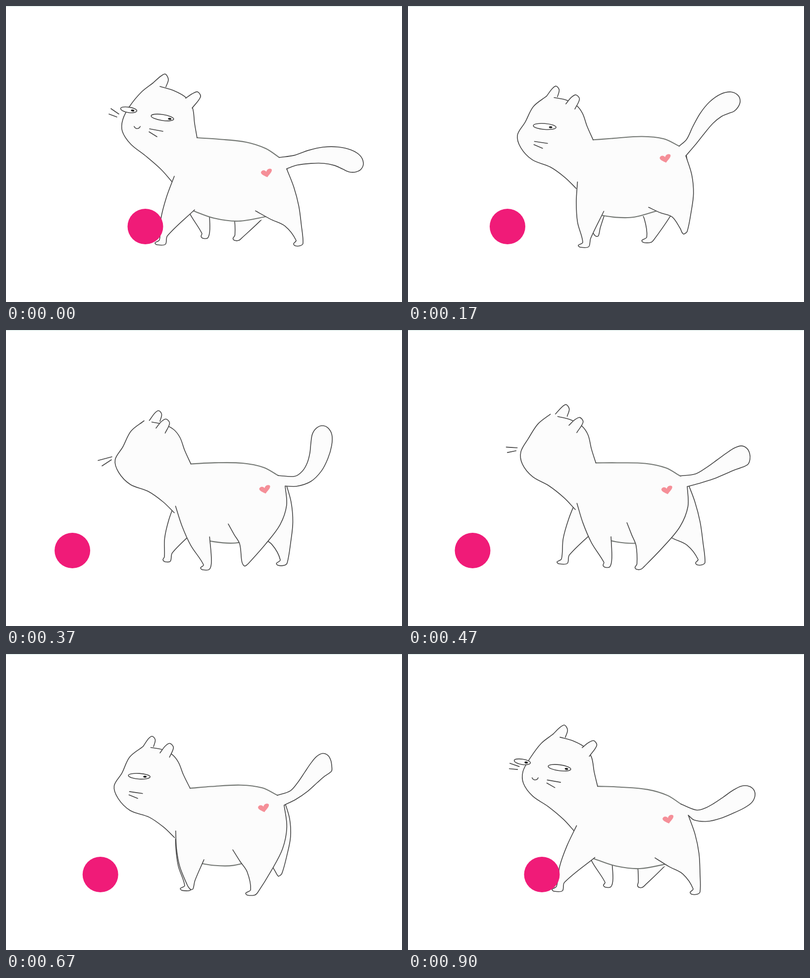
Write an HTML page with a canvas that moves like this. It is 800 px wide and 600 px high and loops after 0.93 s.

```html
<!DOCTYPE html>
<html lang="en">
<head>
<meta charset="utf-8">
<title>Walking cat</title>
<style>
html, body { margin: 0; width: 100%; height: 100%; overflow: hidden; background: #fff }
canvas { display: block }
</style>
</head>
<body>
<canvas id="stage" width="800" height="600"></canvas>
<script>
const ctx = document.getElementById('stage').getContext('2d');
const LOOP = 930, STEPS = 28;
const INK = '#444', SOFT = '#747874', FUR = '#fcfcfc', PINK = '#f01b78';

// Key steps of the walk and the few values that drive the rig there.
const KEYS = [0, 5, 8, 11, 17, 23, 27];
const MOVES = {
  // head raised 0..1, rump lowered 0..1
  sway: [[1, 1], [.52, .18], [0, 0], [.5, .57], [.8, .5], [.13, .14], [.88, .9]],
  // foot x, y and toe length
  front: [[314,484,13], [357,489,13], [380,489,12], [403,486,10], [388,477,2], [346,479,2], [304,481,13]],
  hind: [[592,486,11], [556,462,3], [532,463,2], [482,478,4], [472,489,15], [538,487,15], [582,487,12]],
  // two bend points and the tip
  tail: [
    [600,312, 660,280, 718,330], [585,275, 600,190, 671,193], [595,285, 585,220, 585,144],
    [610,318, 640,275, 639,194], [600,288, 640,238, 715,280], [605,298, 608,230, 600,156],
    [595,345, 630,315, 699,276]],
};

// Two extreme shapes of each part; every pose lies between them.
const HEAD = {
  face: [
    [344,384, 322,366, 295,352, 250,346, 220,323, 205,296, 222,271, 231,236, 261,212],
    [336,357, 313,331, 281,303, 252,280, 235,254, 236,230, 250,203, 274,174, 297,156]],
  crown: [
    [278,210, 298,211, 313,217, 326,229, 341,250, 361,276],
    [311,163, 340,172, 364,186, 377,207, 381,238, 386,267]],
  farEar: [
    [262,211, 269,194, 275,189, 281,193, 279,206],
    [297,156, 313,142, 322,138, 328,149, 323,164]],
  nearEar: [
    [271,211, 280,193, 288,187, 296,194, 295,211],
    [363,187, 376,178, 387,174, 393,184, 376,207]],
  nearWhiskers: [
    [218,302, 244,305, 217,309, 236,314],
    [290,249, 317,254, 289,255, 305,265]],
  farWhiskers: [
    [200,295, 160,321, 202,301, 180,332],
    [228,219, 212,208, 224,225, 208,219]],
};
const BODY = {
  back: [
    [410,268, 470,262, 515,265, 547,279],
    [430,270, 485,276, 525,289, 552,307]],
  belly: [
    [500,412, 455,426, 420,428, 380,424],
    [530,426, 470,436, 420,430, 375,414]],
  hip: [[560,298], [567,330]],
  heart: [[518,302], [526,338]],
};

const mix = ([low, high], t) => low.map((a, i) => a + (high[i] - a) * t);
const mixAll = (parts, t) =>
  Object.fromEntries(Object.entries(parts).map(([name, pair]) => [name, mix(pair, t)]));
const shift = (points, dx) => points.map((v, i) => i % 2 ? v : v + dx);

// Smooth cyclic interpolation between the key rows.
function tween(rows, step) {
  const k = step % STEPS, n = KEYS.length, i = KEYS.findLastIndex(key => key <= k);
  const key = j => KEYS[(j + n) % n] + STEPS * Math.floor(j / n);
  const row = j => rows[(j + n) % n];
  const span = key(i + 1) - key(i), u = (k - key(i)) / span;
  const ease = u * u * (3 - 2 * u);
  return row(i).map((a, c) => {
    const slope = j => (row(j + 1)[c] - row(j - 1)[c]) / (key(j + 1) - key(j - 1)) * span;
    return a + (row(i + 1)[c] - a) * ease
      + slope(i) * u * (1 - u) * (1 - u) - slope(i + 1) * u * u * (1 - u);
  });
}

// Point part of the way from a to b, pushed aside.
const along = (a, b, u, dx, dy = 0) =>
  [a[0] + (b[0] - a[0]) * u + dx, a[1] + (b[1] - a[1]) * u + dy];

function frontLeg([x, y, toe], raise) {
  const top = [345 - 5 * raise, 369 - 24 * raise], ankle = [x - 4, y - 10];
  return [top, along(top, ankle, 1 / 3, -6), along(top, ankle, 2 / 3, -7), ankle,
    [x - toe, y - 4], [x - toe + 4, y], [x + 8, y - 1], [x + 12, y - 18],
    [381 + .34 * (x - 314), 413 + .07 * (x - 314)]].flat();
}

function hindLeg([x, y, toe], hip) {
  const heel = [x + 8, y - 5], ankle = [x - 6, y - 11];
  const thigh = [446 + .5 * (x - 476), 392 + .2 * (x - 476)];
  const bulge = 8 + .17 * (592 - x);
  return [hip, along(hip, heel, .25, .8 * bulge), along(hip, heel, .5, bulge),
    along(hip, heel, .75, .6 * bulge), heel, [x + 2, y], [x - toe + 3, y], [x - toe, y - 4],
    ankle, along(ankle, thigh, 1 / 3, 5, -9), along(ankle, thigh, 2 / 3, 3, -3), thigh].flat();
}

// Widening band with a round end along a cubic curve.
function tailOutline([ax, ay, bx, by, tx, ty], root, hip) {
  const x0 = (root[0] + hip[0]) / 2, y0 = (root[1] + hip[1]) / 2;
  const cubic = (p, a, b, t, u) =>
    p * (1 - u) ** 3 + 3 * a * u * (1 - u) ** 2 + 3 * b * u * u * (1 - u) + t * u ** 3;
  const speed = (p, a, b, t, u) =>
    (a - p) * (1 - u) ** 2 + 2 * (b - a) * u * (1 - u) + (t - b) * u * u;
  const upper = [], lower = [];
  for (let i = 1; i < 8; i++) {
    const u = Math.sin(i / 16 * Math.PI);
    const x = cubic(x0, ax, bx, tx, u), y = cubic(y0, ay, by, ty, u);
    const dx = speed(x0, ax, bx, tx, u), dy = speed(y0, ay, by, ty, u);
    const cap = Math.max(0, (u - .85) / .15);
    const w = (7 + 17 * u) * Math.sqrt(1 - cap * cap) / Math.hypot(dx, dy);
    upper.push(x + dy * w, y - dx * w);
    lower.unshift(x - dy * w, y + dx * w);
  }
  return [...root, ...upper, tx, ty, ...lower, ...hip];
}

// Traces a spline through x, y pairs.
function trace(v) {
  const n = v.length / 2, p = i => [v[2 * i], v[2 * i + 1]];
  const dist = (a, b) => Math.hypot(b[0] - a[0], b[1] - a[1]);
  const tangent = i => {
    const a = p(Math.max(i - 1, 0)), m = p(i), b = p(Math.min(i + 1, n - 1));
    const d = dist(a, m) + dist(m, b) || 1;
    return [(b[0] - a[0]) / d, (b[1] - a[1]) / d];
  };
  ctx.beginPath();
  ctx.moveTo(...p(0));
  for (let i = 1; i < n; i++) {
    const a = p(i - 1), b = p(i), s = tangent(i - 1), e = tangent(i), d = dist(a, b) / 3;
    ctx.bezierCurveTo(a[0] + s[0] * d, a[1] + s[1] * d, b[0] - e[0] * d, b[1] - e[1] * d, b[0], b[1]);
  }
}

function stroke(color = INK, width = 1.6) {
  ctx.strokeStyle = color;
  ctx.lineWidth = width;
  ctx.stroke();
}

function fill(color) {
  ctx.fillStyle = color;
  ctx.fill();
}

function line(points, color, width) {
  trace(points);
  stroke(color, width);
}

function shape(points) {
  trace(points);
  fill(FUR);
  stroke();
}

function whiskers(v) {
  line(v.slice(0, 4));
  line(v.slice(4));
}

function at(x, y, tilt, paint) {
  ctx.save();
  ctx.translate(x, y);
  ctx.rotate(tilt);
  ctx.beginPath();
  paint();
  ctx.restore();
}

// The upper lid closes as open goes to 0.
function eye(x, y, w, open, tilt, pupil) {
  at(x, y, tilt, () => {
    ctx.ellipse(0, 0, w, 6, 0, 0, Math.PI);
    ctx.ellipse(0, 0, w, .5 + 5.5 * open, 0, Math.PI, 2 * Math.PI);
    ctx.closePath();
    fill('#fff');
    stroke();
    ctx.beginPath();
    ctx.ellipse(pupil, 1.5 - open, 3.5, 2, 0, 0, 7);
    fill('#222');
  });
}

function heart() {
  ctx.moveTo(2, 9);
  ctx.bezierCurveTo(-4, 6, -11, 4, -11, -1);
  ctx.bezierCurveTo(-9, -6, -3, -6, 0, -2);
  ctx.bezierCurveTo(1, -9, 10, -10, 11, -6);
  ctx.bezierCurveTo(11.5, -1, 5, 4, 2, 9);
  fill('#f58f98');
}

// Rolls off, slows down, then returns at a steady pace.
const ballX = k => k < 12
  ? 281.5 - 16.38 * k + .00224 * k ** 4
  : Math.max(130.5, 156.5 + 11.4 * (k - 17));

function draw(k) {
  const [raise, sink] = tween(MOVES.sway, k);
  const { face, crown, farEar, nearEar, nearWhiskers, farWhiskers } = mixAll(HEAD, raise);
  const body = mixAll(BODY, sink), { hip, belly } = body;
  const back = [...crown.slice(-2), ...body.back];
  const turnedAway = k > 9 && k < 20, facing = k < 3 || k > 25;

  ctx.fillStyle = '#fff';
  ctx.fillRect(0, 0, 800, 600);
  ctx.fillStyle = '#9cc4bc';
  for (let x = 0; x < 800; x += 2) ctx.fillRect(x, 0, 1, 1);
  ctx.lineCap = ctx.lineJoin = 'round';

  // The far legs repeat the near ones half a loop later.
  at(0, -10, 0, () => {
    shape(frontLeg(tween(MOVES.front, k + STEPS / 2), raise));
    shape(hindLeg(tween(MOVES.hind, k + STEPS / 2), hip));
  });
  trace([...face, ...crown, ...back, ...hip, ...belly]);
  fill(FUR);
  line(belly, SOFT, 2.1);
  shape(hindLeg(tween(MOVES.hind, k), hip));
  line(back, SOFT, 2.1);
  line(face);
  line(crown);
  shape(tailOutline(tween(MOVES.tail, k), back.slice(-2), hip));
  shape(frontLeg(tween(MOVES.front, k), raise));
  if (turnedAway) [shift(nearEar, -14), shift(farEar, 10)].forEach(shape);
  else [farEar, nearEar].forEach(shape);
  at(...body.heart, 0, heart);

  if (!turnedAway) {
    const open = Math.max(0, Math.min(1, 2 * raise));
    eye(233 + 83 * raise, 264 - 38 * raise, 15 + 8 * open, open, .15 * raise, 9 + 6 * raise);
    whiskers(nearWhiskers);
  }
  if (facing) eye(106 + 142 * raise, 277 - 67 * raise, 16.5, .8, .15, 8);
  if (facing || turnedAway) whiskers(farWhiskers);
  if (k < 3 || k > 21) {
    at(197 + 68 * raise, 300 - 56 * raise, 0, () => {
      ctx.arc(0, -2, 6.5, .1 * Math.PI, .9 * Math.PI);
      stroke();
    });
  }

  at(ballX(k), 447, 0, () => {
    ctx.arc(0, 0, 36, 0, 7);
    fill(PINK);
  });
}

// Thirty drawings per second, held on a 10 ms grid.
function tick() {
  const t = performance.now() % LOOP;
  draw(Math.floor(Math.floor(t / 10) * .3 + .15));
  requestAnimationFrame(tick);
}
tick();
</script>
</body>
</html>
```
